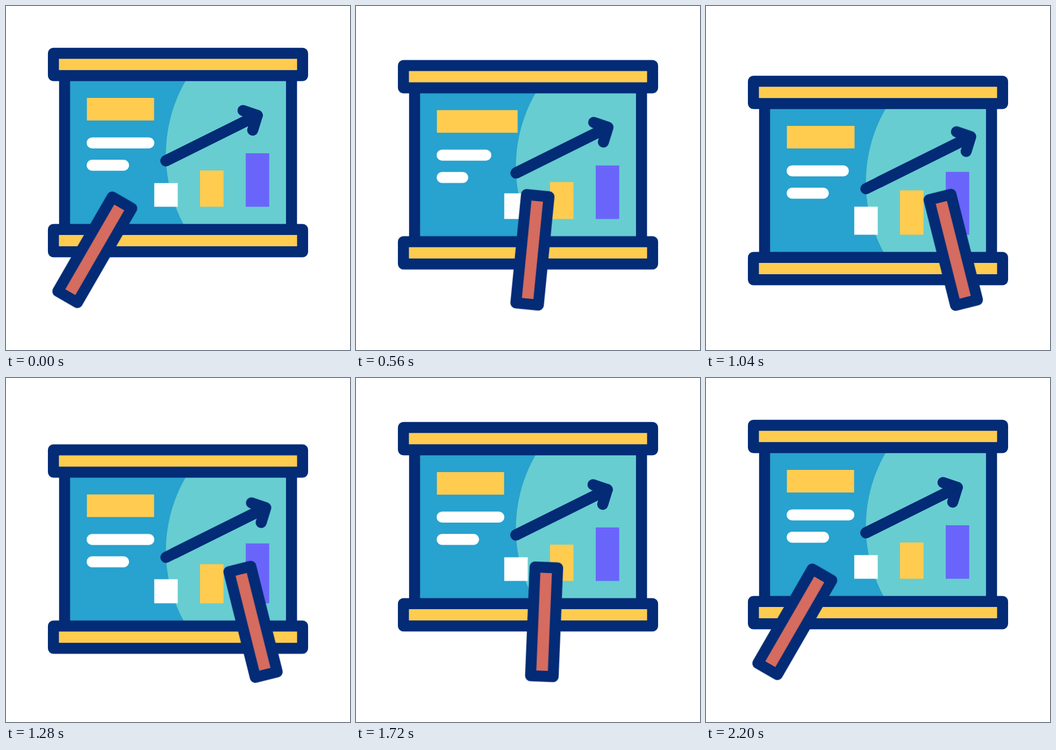
Animation, 640 px wide and 640 px high, one loop 2.6 s. Source, as an HTML page:

```html
<!DOCTYPE html>
<html lang="en">
<head>
<meta charset="utf-8">
<title>Presentation board</title>
<style>
  html, body { margin: 0; width: 100%; height: 100%; overflow: hidden; background: #fff; }
  svg { display: block; width: 100%; height: 100%; }

  .ink { stroke: #032b76; stroke-width: 20.5; stroke-linecap: round; stroke-linejoin: round; fill: none; }
  .gold { fill: #ffcc50; }
  .blue { fill: #28a2ce; }
  .teal { fill: #67cdd1; }
  .violet { fill: #6a65fa; }
  .red { fill: #d56c5f; }
  .white { fill: #fff; }

  .board, .title, .line, .bar, .arrow, .stick {
    animation: 2600ms cubic-bezier(.333, 0, .667, 1) infinite;
  }
  .title, .bar { transform-box: fill-box; }
  .title { transform-origin: left; animation-name: title; }
  .bar { transform-origin: bottom; }

  .board { animation-name: board; }
  .long { animation-name: long; }
  .short { animation-name: short; }
  .low { animation-name: low; }
  .mid { animation-name: mid; }
  .high { animation-name: high; }
  .arrow { animation-name: arrow; }
  .stick { animation-name: stick; }

  @keyframes board {
    0%, 7.31% { transform: translateY(0); }
    38.46% { transform: translateY(52px); }
    43.27% { transform: translateY(52px); animation-timing-function: cubic-bezier(.333, 0, .6, 1); }
    71.73%, 100% { transform: translateY(0); }
  }
  @keyframes title {
    0%, 10.77%, 41.54%, 100% { transform: scaleX(1); }
    26.15% { transform: scaleX(1.256); }
  }
  @keyframes long {
    0%, 13.85%, 44.62%, 100% { width: 126px; }
    29.23% { width: 78px; }
  }
  @keyframes short {
    0%, 9.23%, 41.54%, 100% { width: 79px; }
    24.62% { width: 56.6px; }
  }
  @keyframes low {
    0%, 15.38%, 52.31%, 100% { transform: scaleY(1); }
    32.31% { transform: scaleY(1.277); }
  }
  @keyframes mid {
    0%, 18.46%, 56.92%, 100% { transform: scaleY(1); }
    36.92% { transform: scaleY(1.237); }
  }
  @keyframes high {
    0%, 21.54%, 60%, 100% { transform: scaleY(1); }
    42.31% { transform: scaleY(1.181); }
  }
  @keyframes arrow {
    0%, 18.46%, 60%, 100% { transform: translate(0, 0); }
    41.54% { transform: translate(25.3px, -12.6px); }
  }
  @keyframes stick {
    0%, 7.04% { transform: translate(165.2px, 453.6px) rotate(30deg); }
    34.19% { transform: translate(460px, 453.6px) rotate(-14.1deg); }
    47.69% {
      transform: translate(460px, 453.6px) rotate(-14.1deg);
      animation-timing-function: cubic-bezier(.7, 0, .435, 1);
    }
    84.62%, 100% { transform: translate(165.2px, 453.6px) rotate(30deg); }
  }
</style>
</head>
<body>
<svg viewBox="0 0 640 640">
  <clipPath id="sheet"><rect x="109" y="129.5" width="422.2" height="286.2"/></clipPath>

  <g class="board">
    <rect class="blue" x="109" y="129.5" width="422.2" height="286.2"/>
    <circle class="teal" cx="571" cy="276" r="273.5" clip-path="url(#sheet)"/>
    <path class="ink" d="M109 129.5V415.7M531.2 129.5V415.7"/>
    <rect class="ink gold" x="88.2" y="87.9" width="463.6" height="41.6"/>
    <rect class="ink gold" x="88.2" y="415.7" width="463.6" height="41.6"/>

    <rect class="title gold" x="150.5" y="171" width="125" height="42"/>
    <rect class="line long white" x="150" y="244.5" width="126" height="20.5" rx="10.25"/>
    <rect class="line short white" x="150" y="286" width="79" height="20.5" rx="10.25"/>

    <rect class="bar low white" x="275.8" y="329.5" width="43.7" height="44"/>
    <rect class="bar mid gold" x="361" y="306" width="43.7" height="67.5"/>
    <rect class="bar high violet" x="446" y="274" width="43.7" height="99.5"/>

    <!-- the sliding copy of the shaft lengthens the fixed one -->
    <path class="ink" d="M297.5 288L467.5 203.5"/>
    <path class="ink arrow" d="M297.5 288L467.5 203.5M441 194.5L467.5 203.5L459 231"/>
  </g>

  <rect class="ink red stick" x="-21" y="-101.25" width="42" height="202.5"/>
</svg>
</body>
</html>
```
